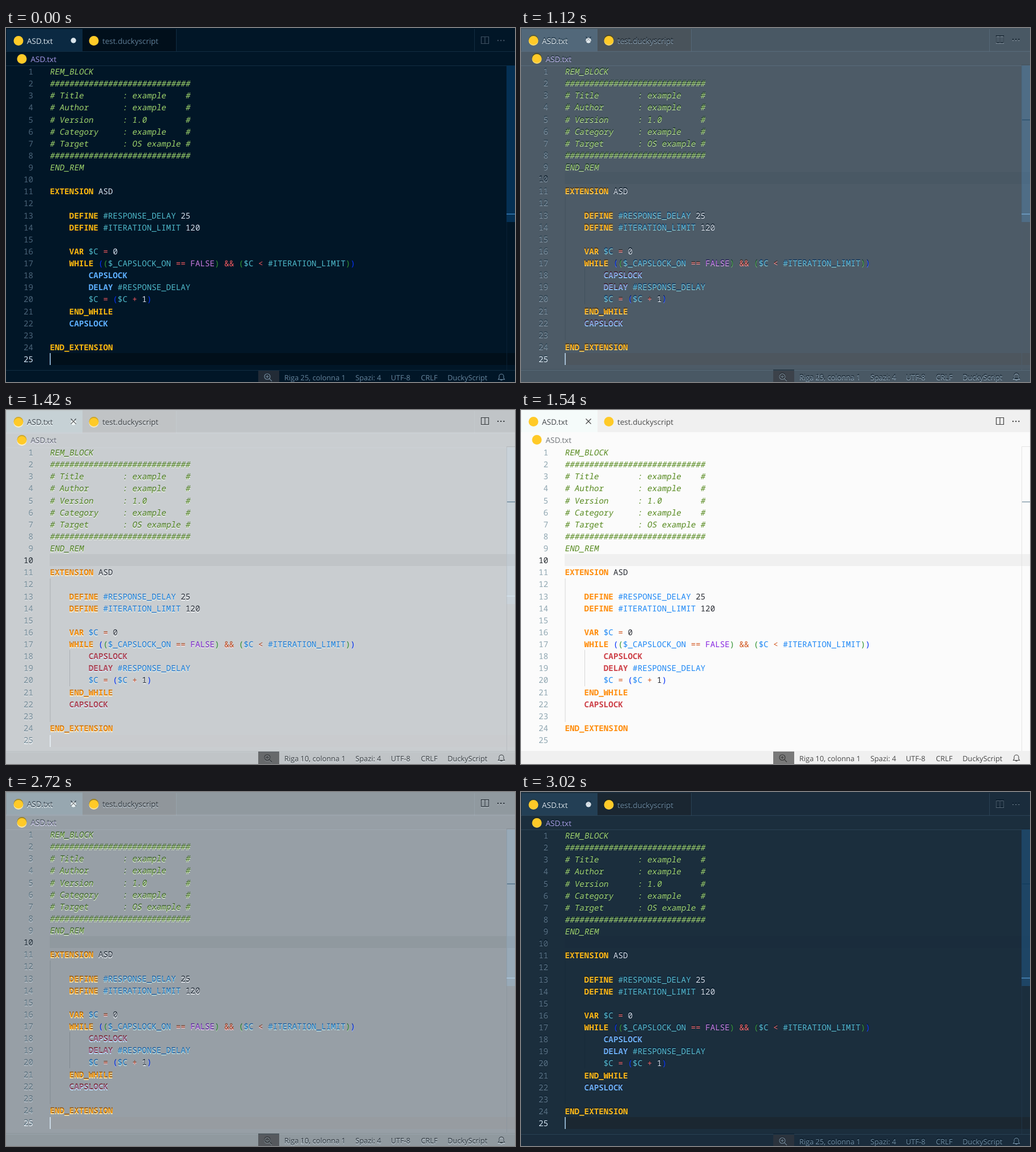
Animation of 898 by 624 pixels, one loop 3.08 s. Source, as an HTML page:

```html
<!DOCTYPE html>
<html lang="it">
<head>
<meta charset="utf-8">
<title>Editor theme fade</title>
<style>
html, body { margin: 0; width: 100%; height: 100%; overflow: hidden; background: #011627; }
svg { position: absolute; left: 0; top: 0; width: 898px; height: 624px; }
text { white-space: pre; text-rendering: geometricPrecision; }
.code { font: 14.25px "Noto Sans Mono", "DejaVu Sans Mono", monospace; }
.ui { font: 13.5px "Open Sans", "Noto Sans", sans-serif; }
.status { font-size: 12.8px; }
.bold { font-weight: 700; }
.slant { transform: skewX(-10deg); transform-box: fill-box; transform-origin: 0 75%; }
</style>
</head>
<body>
<script>
const source = `REM_BLOCK
#############################
# Title        : example    #
# Author       : example    #
# Version      : 1.0        #
# Category     : example    #
# Target       : OS example #
#############################
END_REM

EXTENSION ASD

    DEFINE #RESPONSE_DELAY 25
    DEFINE #ITERATION_LIMIT 120

    VAR $C = 0
    WHILE (($_CAPSLOCK_ON == FALSE) && ($C < #ITERATION_LIMIT))
        CAPSLOCK
        DELAY #RESPONSE_DELAY
        $C = ($C + 1)
    END_WHILE
    CAPSLOCK

END_EXTENSION
`.split('\n');

const dark = {
  dy: 0, bg: '#011627', bar: '#011627', active: '#0b2942', inactive: '#010f1b', line: '#122d42',
  tab: '#dde7ee', tab2: '#5f7e97', crumb: '#a599e9', icon: '#3f5162', status: '#66859d',
  zoom: '#222b36', zoomIcon: '#6f8799', row: 25, rowBg: '#010f1a', num: '#4b6479', numOn: '#d5e6f5',
  text: '#d6deeb', comment: '#9fd46c', keyword: '#ffb90f', command: '#5eb0ff',
  name: '#4fb9ca', op: '#f2595f', constant: '#c678dd'
};
const light = {
  dy: -2, bg: '#fbfbfb', bar: '#f0f0f0', active: '#f5fbfa', inactive: '#f0f0f0', line: 'none',
  tab: '#45484c', tab2: '#4a4a4a', crumb: '#707478', icon: '#424242', status: '#484848',
  zoom: '#797979', zoomIcon: '#3c3c3c', row: 10, rowBg: '#f0f0f0', num: '#90a7b2', numOn: '#24292e',
  text: '#2c2f36', comment: '#578a1f', keyword: '#ff8c0a', command: '#cd3f47',
  name: '#1e88f5', op: '#d2561e', constant: '#8a2be2'
};

const left = 77.4, charW = 8.55, lineH = 21.125;
const baseline = n => 82 + (n - 1) * lineH;
const esc = s => s.replace(/&/g, '&amp;').replace(/</g, '&lt;');
const rect = (x, y, w, h, fill) => `<rect x="${x}" y="${y}" width="${w}" height="${h}" fill="${fill}"/>`;
const text = (x, y, s, fill, cls, more = '') =>
  `<text x="${x}" y="${y}" fill="${fill}" class="${cls}" ${more}>${esc(s)}</text>`;
const path = (d, stroke, w = 1) => `<path d="${d}" fill="none" stroke="${stroke}" stroke-width="${w}"/>`;
const dot = (x, y, r, fill) => `<circle cx="${x}" cy="${y}" r="${r}" fill="${fill}"/>`;

function codeLine(s, n, c) {
  const y = baseline(n);
  if (n < 10) return text(left - 0.5, y, s, c.comment, 'code slant');
  let depth = 0;
  const tint = t => {
    if (t === '(') return ['#0431fa', '#319331'][depth++];
    if (t === ')') return ['#0431fa', '#319331'][--depth];
    if (/^[#$]/.test(t)) return c.name;
    if (/^(CAPSLOCK|DELAY)$/.test(t)) return c.command;
    if (/^(EXTENSION|DEFINE|VAR|WHILE|END_\w+)$/.test(t)) return c.keyword;
    if (t === 'FALSE') return c.constant;
    return /\w/.test(t) ? c.text : c.op;
  };
  // The third name in line 17 opens inside the outer bracket, so depth carries along the line.
  return [...s.matchAll(/[#$]?\w+|[()]|[^\s\w()#$]+/g)].map(m => {
    const fill = tint(m[0]);
    const bold = fill === c.keyword || fill === c.command ? ' bold' : '';
    return text(left + m.index * charW, y, m[0], fill, 'code' + bold);
  }).join('');
}

function tabs(c) {
  return rect(0, 2, 898, 39, c.bar) + rect(135, 2, 165, 39, c.inactive) + rect(1, 2, 134, 39, c.active) +
    path('M0 41.5H898M0 66.5H883M300.5 2V41M826.5 2V41', c.line) +
    dot(22, 22.5, 8.5, '#ffca28') + dot(155, 22.5, 8.5, '#ffca28') + dot(28, 54.5, 8.5, '#ffca28') +
    text(37, 27.5, 'ASD.txt', c.tab, 'ui') + text(170, 27.5, 'test.duckyscript', c.tab2, 'ui') +
    text(43.5, 59.5, 'ASD.txt', c.crumb, 'ui') +
    (c === dark ? dot(119, 22, 4.7, '#dbe5ec') : path('M114.5 17.5l9 9m0-9l-9 9', c.icon, 1.2)) +
    path('M838.5 15.5h13v12h-13zM845 15.5v12', c.icon, 1.2) +
    [868, 873.2, 878.4].map(x => dot(x, 22, 1.2, c.icon)).join('');
}

function ruler(c) {
  return c === dark
    ? path('M883.5 67V603', '#0a2135') + rect(883, 66, 15, 276, '#053054') + rect(883, 327, 15, 2, '#2b6a9e')
    : path('M898 66.5H883.5V603', '#e4e4e4') + rect(884, 163, 14, 2, '#a3b5c0') +
      path('M78 299V552M112.5 425V489', '#d6d6d6');
}

function statusBar(c) {
  const items = [[491, `Riga ${c.row}, colonna 1`], [616.5, 'Spazi: 4'],
    [679, 'UTF-8'], [732, 'CRLF'], [779, 'DuckyScript']];
  return rect(0, 603, 898, 30, c.bar) + path('M0 603.5H898', c.line) + rect(445, 604, 37, 30, c.zoom) +
    path('M456 614.5a5 5 0 1 0 10 0a5 5 0 1 0-10 0M464.7 618.2l4.3 4.3M458.5 614.5h5M461 612v5', c.zoomIcon, 1.2) +
    items.map(([x, s]) => text(x, 620.5, s, c.status, 'ui status')).join('') +
    path('M868.5 619.5h11l-1.5-2.5v-3a4 4 0 0 0-8 0v3zM872.5 620a1.6 1.6 0 0 0 3 0', c.status, 1.1);
}

function editor(c) {
  const rows = source.map((s, i) => {
    const n = i + 1;
    return text(48, baseline(n), String(n), n === c.row ? c.numOn : c.num, 'code', 'text-anchor="end"') +
      codeLine(s, n, c);
  });
  const rowY = Math.round(baseline(c.row) - 16);
  return `<svg viewBox="0 0 898 624">${rect(0, 0, 898, 624, c.bg)}<g transform="translate(0 ${c.dy})">` +
    rect(77, rowY, 821, 21, c.rowBg) + ruler(c) + tabs(c) + rows.join('') +
    (c === dark ? rect(77, 573, 2, 21, '#80a4c2') : '') + statusBar(c) + '</g></svg>';
}

document.body.innerHTML = editor(dark) + editor(light);
const overlay = document.body.lastElementChild;
const start = performance.now();

// Ten steps of 60 ms; the first one shows at the given time.
const steps = (t, from) => Math.max(0, Math.min(10, Math.floor((t - from) / 60) + 1)) / 10;

function draw(now) {
  const t = Math.max(0, now - start) % 3080;
  overlay.style.opacity = steps(t, 1000) - steps(t, 2540);
  requestAnimationFrame(draw);
}
draw(start);
</script>
</body>
</html>
```
